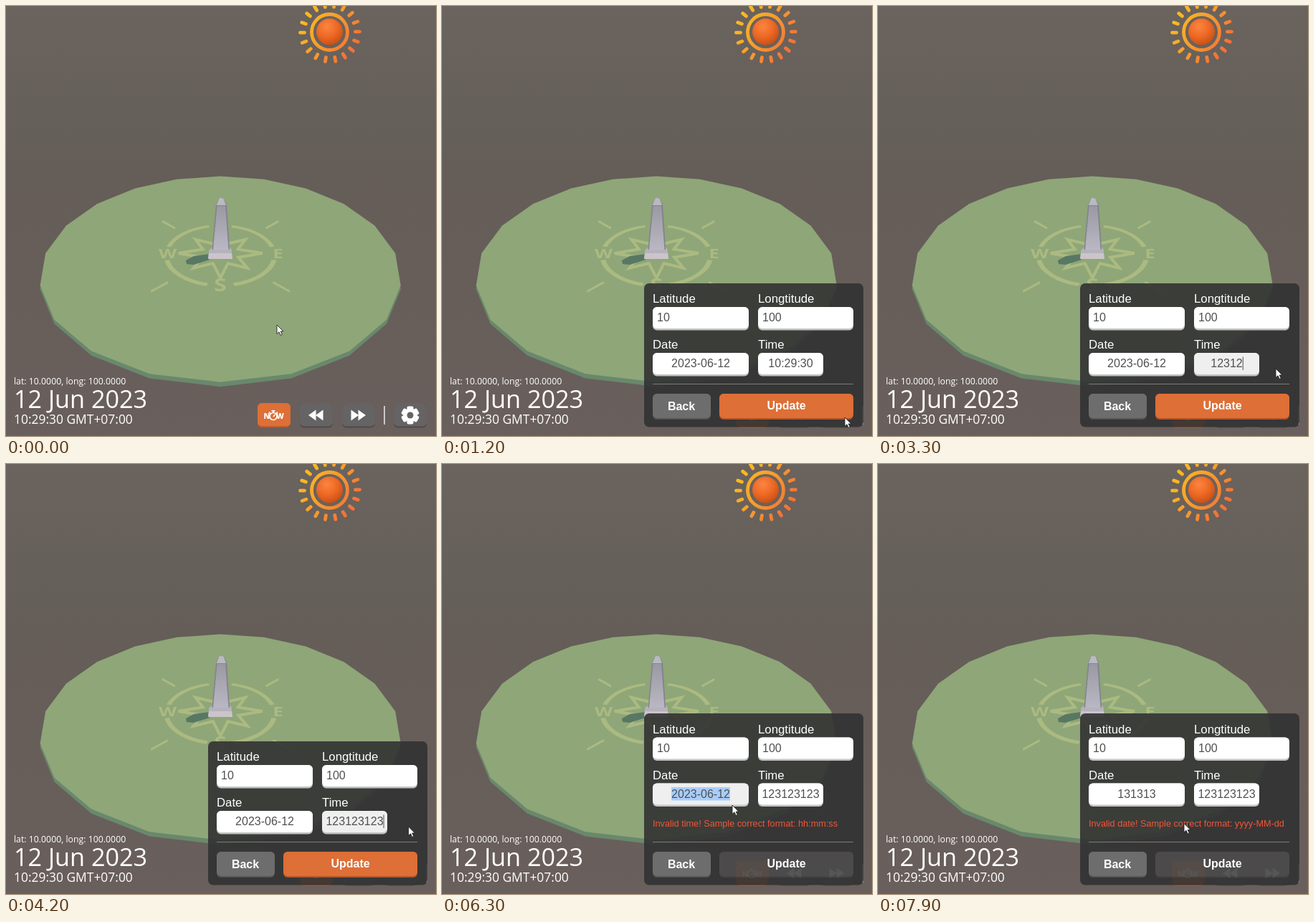
Recreate the animation shown at these times as an HTML page. Size 600 by 600 pixels, loop 8 s.

```html
<!DOCTYPE html>
<html lang="en">
<head>
<meta charset="utf-8">
<title>Sundial settings</title>
<style>
  html, body { margin: 0; width: 100%; height: 100%; overflow: hidden; background: #655d58; }
  svg { display: block; width: 100vw; height: 100vh; }
  .info, .letter { font-family: "Open Sans", sans-serif; fill: #fff; }
  .letter { font-weight: 700; fill: #abba81; text-anchor: middle; }
  #panel { font: 16px "Liberation Sans", Arial, sans-serif; }
  .label { font-size: 16.8px; fill: #fff; }
  .value { fill: #505050; }
  .mid { text-anchor: middle; }
  .bold { font-weight: 700; fill: #fff; text-anchor: middle; }
  #error { font-size: 12.7px; fill: #f0563a; }
</style>
</head>
<body>
<svg viewBox="0 0 600 600">
  <defs>
    <linearGradient id="sky" x2="0" y2="1">
      <stop offset="0" stop-color="#6a635e"/>
      <stop offset=".3" stop-color="#655f59"/>
      <stop offset=".4" stop-color="#655d58"/>
      <stop offset="1" stop-color="#695f5c"/>
    </linearGradient>
    <linearGradient id="glow" gradientUnits="userSpaceOnUse" x1="418" y1="14" x2="486" y2="60">
      <stop offset="0" stop-color="#fbba22"/>
      <stop offset=".5" stop-color="#f7992e"/>
      <stop offset="1" stop-color="#f27039"/>
    </linearGradient>
    <radialGradient id="ball" cx=".4" cy=".3" r=".75">
      <stop offset="0" stop-color="#fb8540"/>
      <stop offset=".5" stop-color="#ee6a26"/>
      <stop offset="1" stop-color="#c74d12"/>
    </radialGradient>
    <linearGradient id="stone" x2="0" y2="1">
      <stop offset="0" stop-color="#9a9aa3"/>
      <stop offset="1" stop-color="#b9b7c3"/>
    </linearGradient>
  </defs>
  <rect width="600" height="600" fill="url(#sky)"/>
  <g id="ground"></g>

  <path d="M284 346L262 349 251 355 252 360 262 361 284 354Z" fill="#587863"/>
  <path d="M282 353L283.500 340 289 336H311L314.500 339 316 353Z" fill="#b6b2bd"/>
  <path d="M282 353L283 345H315L316 353Z" fill="#cbc5ca"/>
  <path d="M287.500 340L293 277 298 267.500 303.500 268.500 308 277 312 340Z" fill="#83838d"/>
  <path d="M289 340L294.500 279H306L310.500 340Z" fill="url(#stone)"/>
  <path d="M293.500 278L298 267.500 303.500 268.500 307 278Z" fill="#b9b9c1"/>

  <g id="sun" fill="none" stroke="url(#glow)" stroke-linecap="round"></g>

  <g class="info">
    <text x="11" y="528" font-size="12.300">lat: 10.0000, long: 100.0000</text>
    <text x="11" y="560.500" font-size="34.200">12 Jun 2023</text>
    <text x="11" y="583" font-size="17.400">10:29:30 GMT+07:00</text>
  </g>
  <g id="bar"></g>

  <g id="panel">
    <rect id="back" x="282" width="306" rx="7" fill="#323232" fill-opacity=".9"/>
    <g id="form"></g>
    <text id="error" x="294" y="506"></text>
    <path d="M294 527.500H574" stroke="#7d7b7a"/>
    <g id="actions"></g>
  </g>
  <path id="cursor" d="M0 0V12.500L3 9.800 5.200 14.500 7.300 13.500 5.200 9H9Z" fill="#fff" stroke="#222" stroke-width=".9"/>
</svg>
<script>
const $ = id => document.getElementById(id);
const show = (id, on) => $(id).setAttribute('display', on ? 'inline' : 'none');

// Perspective view of the ground: polar (radius, degrees from north) to screen.
function project(r, deg) {
  const a = deg * Math.PI / 180, north = r * Math.cos(a), depth = 1 + .2518 * north;
  return [299.2 + 244 * r * Math.sin(a) / depth, 345 - 134.5 * north / depth, 1 / depth];
}
const range = (n, f) => Array.from({ length: n }, (_, i) => f(i));
const poly = pts => 'M' + pts.map(p => p[0].toFixed(1) + ' ' + p[1].toFixed(1)).join('L') + 'Z';

function ground() {
  const rim = range(20, i => project(1, i * 18));
  const low = rim.map(([x, y, s]) => [x, y + 4.8 * s]);
  const star = range(16, i => project(i % 2 ? .11 : i % 4 ? .21 : .24, i * 22.5));
  // The ring breaks where the letters stand.
  const ring = [0, 90, 180, 270].map(a => poly([
    ...range(15, i => project(.322, a + 13 + i * 64 / 14)),
    ...range(15, i => project(.294, a + 77 - i * 64 / 14))])).join('');
  const rays = [45, 135, 225, 315].map(a => {
    const [x, y] = project(.4, a), [u, v] = project(.505, a);
    return `M${x} ${y}L${u} ${v}`;
  }).join('');
  const letter = (c, x, y, size, sy) =>
    `<text class="letter" font-size="${size}" transform="translate(${x} ${y}) scale(1 ${sy})">${c}</text>`;
  return `<path d="${poly(low)}" fill="#69886c"/><path d="${poly(rim)}" fill="#8fa678"/>
    <g fill="none" stroke="#abba81" stroke-width="4">
      <path d="${poly(star)}"/><path d="${rays}" stroke-width="3" stroke-linecap="round"/></g>
    <path d="${ring}" fill="#abba81"/>` +
    letter('W', 225.5, 352, 26, .7) + letter('E', 379.5, 352, 26, .7) + letter('S', 299, 397.5, 32, .78);
}

function sun() {
  const rays = range(18, i => {
    const a = (i * 20 - 1) * Math.PI / 180, at = r => `${452 + r * Math.cos(a)} ${36.5 + r * Math.sin(a)}`;
    return `M${at(35.5)}L${at(41.5)}`;
  }).join('');
  return `<circle cx="451.500" cy="36.500" r="25" stroke-width="4.800"/>
    <path d="${rays}" stroke-width="4.800"/>
    <circle cx="451.500" cy="36" r="18.500" fill="url(#ball)" stroke="none"/>`;
}

const button = (x, y, w, h, face, edge) =>
  `<rect x="${x}" y="${y}" width="${w}" height="${h}" rx="6" fill="${edge}"/>
   <rect x="${x}" y="${y}" width="${w}" height="${h - 2}" rx="6" fill="${face}"/>`;

function bar() {
  const grey = x => button(x, 554, 46, 34.5, '#656363', '#4d4b4b');
  const teeth = range(6, i => `<rect x="-4.500" y="-12.500" width="9" height="8" rx="2" transform="rotate(${i * 60})"/>`).join('');
  return `<g id="tools">
    ${button(351, 554, 46, 34.5, '#dd6f37', '#b3562a')}
    <g fill="#fff" font-family="Open Sans, sans-serif" font-weight="800" font-size="10.500">
      <text x="359.500" y="576">N</text><text x="377" y="576">W</text>
      <g fill="none" stroke="#fff" stroke-width="1.700"><circle cx="373" cy="572.500" r="5"/>
        <path d="M373 573L375.500 570M370.500 564.800H375.500M373 565V567M367 566.500L369 568.500M379 566.500L377 568.500"/></g>
    </g>
    ${grey(410)}<path d="M422 571L432.500 563.500V578.500ZM432 571L442.500 563.500V578.500Z" fill="#fff"/>
    ${grey(469)}<path d="M502 571L491.500 563.500V578.500ZM492 571L481.500 563.500V578.500Z" fill="#fff"/>
    <path d="M528 558V584" stroke="#e4e2e1" stroke-width="1.600"/></g>
    <g id="gear">${grey(541)}<g transform="translate(564 571)" fill="#fff">${teeth}
      <circle r="9.500"/><circle r="4.500" fill="#656363"/></g></g>`;
}

function form() {
  const field = (name, x, y, w, label, value) => {
    const mid = y > 450;
    return `<text class="label" x="${x}" y="${y - 5.7}">${label}</text>
      <rect x="${x}" y="${y}" width="${w}" height="32.500" rx="6" fill="#c4c3c3"/>
      <rect id="${name}Face" x="${x}" y="${y}" width="${w}" height="30" rx="6" fill="#fff"/>
      <rect id="${name}Mark" y="${y + 5.5}" height="18.500" fill="#a8cdfb"/>
      <text id="${name}" class="value ${mid ? 'mid' : ''}" x="${mid ? x + w / 2 : x + 6}" y="${y + 20}">${value}</text>`;
  };
  return field('lat', 294, 420, 134, 'Latitude', '10') + field('long', 441, 420, 133, 'Longtitude', '100') +
    field('date', 294, 484, 134, 'Date', '') + field('time', 441, 484, 91, 'Time', '');
}

$('ground').innerHTML = ground();
$('sun').innerHTML = sun();
$('bar').innerHTML = bar();
$('form').innerHTML = form();
$('actions').innerHTML = button(294, 541, 81, 36, '#6e6d6e', '#565556') +
  `<text class="bold" x="334" y="564">Back</text>
   <g id="on">${button(387, 541, 187, 36, '#dd6f37', '#b3562a')}</g>
   <g id="off" opacity=".28">${button(387, 541, 187, 36, '#838080', '#6a6868')}</g>
   <text class="bold" x="480.500" y="562.500">Update</text>`;

// Cursor stops: [time, x, y]
const stops = [[0, 378, 445], [900, 562, 574], [1500, 562, 574], [2200, 495.5, 501.5], [2400, 495.5, 501.5],
  [2600, 555, 506], [3600, 555, 506], [3800, 561.5, 506], [5200, 561.5, 506], [5900, 405, 476],
  [7300, 405, 476], [7700, 427, 501.5], [8000, 427, 501.5]];

function cursorAt(t) {
  const i = stops.findIndex(s => s[0] > t), [t0, x0, y0] = stops[i - 1], [t1, x1, y1] = stops[i];
  const u = (t - t0) / (t1 - t0), k = u * u * (3 - 2 * u);
  return [x0 + (x1 - x0) * k, y0 + (y1 - y0) * k];
}

// Focus selects the old value, typing replaces it, leaving ends the edit.
function edit(name, t, old, typed, focus, type, leave) {
  const text = $(name), mark = $(name + 'Mark');
  const count = Math.max(0, Math.floor((t - type) / 100));
  const active = t >= focus && t < leave, selected = active && t < type;
  text.textContent = t < type ? old : typed.slice(0, count);
  const len = text.getComputedTextLength(), mid = +text.getAttribute('x');
  $(name + 'Face').setAttribute('fill', active ? '#efefef' : '#fff');
  show(name + 'Mark', active);
  mark.setAttribute('x', selected ? mid - len / 2 : mid + len / 2);
  mark.setAttribute('width', selected ? len : 1);
  mark.setAttribute('fill', selected ? '#a8cdfb' : '#505050');
}

function draw(now) {
  const t = Math.floor(now % 8000 / 100) * 100; // ten steps a second
  const open = t >= 1200, bad = t >= 4400;
  $('cursor').setAttribute('transform', `translate(${cursorAt(t)})`);
  show('panel', open);
  show('gear', !open);
  show('latMark', false);
  show('longMark', false);
  $('tools').setAttribute('transform', `translate(${open ? 59 : 0})`);
  if (open) {
    $('back').setAttribute('y', bad ? 348 : 387);
    $('back').setAttribute('height', bad ? 239.5 : 200.5);
    $('form').setAttribute('transform', `translate(0 ${bad ? -38.5 : 0})`);
    show('on', !bad);
    show('off', bad);
    edit('time', t, '10:29:30', '123123123', 2200, 2800, 4400);
    edit('date', t, '2023-06-12', '131313', 6100, 6500, 7300);
    $('error').textContent = !bad ? '' : t < 7300
      ? 'Invalid time! Sample correct format: hh:mm:ss'
      : 'Invalid date! Sample correct format: yyyy-MM-dd';
  }
}

let start;
function tick(now) {
  start ??= now;
  draw(now - start);
  requestAnimationFrame(tick);
}
draw(0);
requestAnimationFrame(tick);
</script>
</body>
</html>
```
